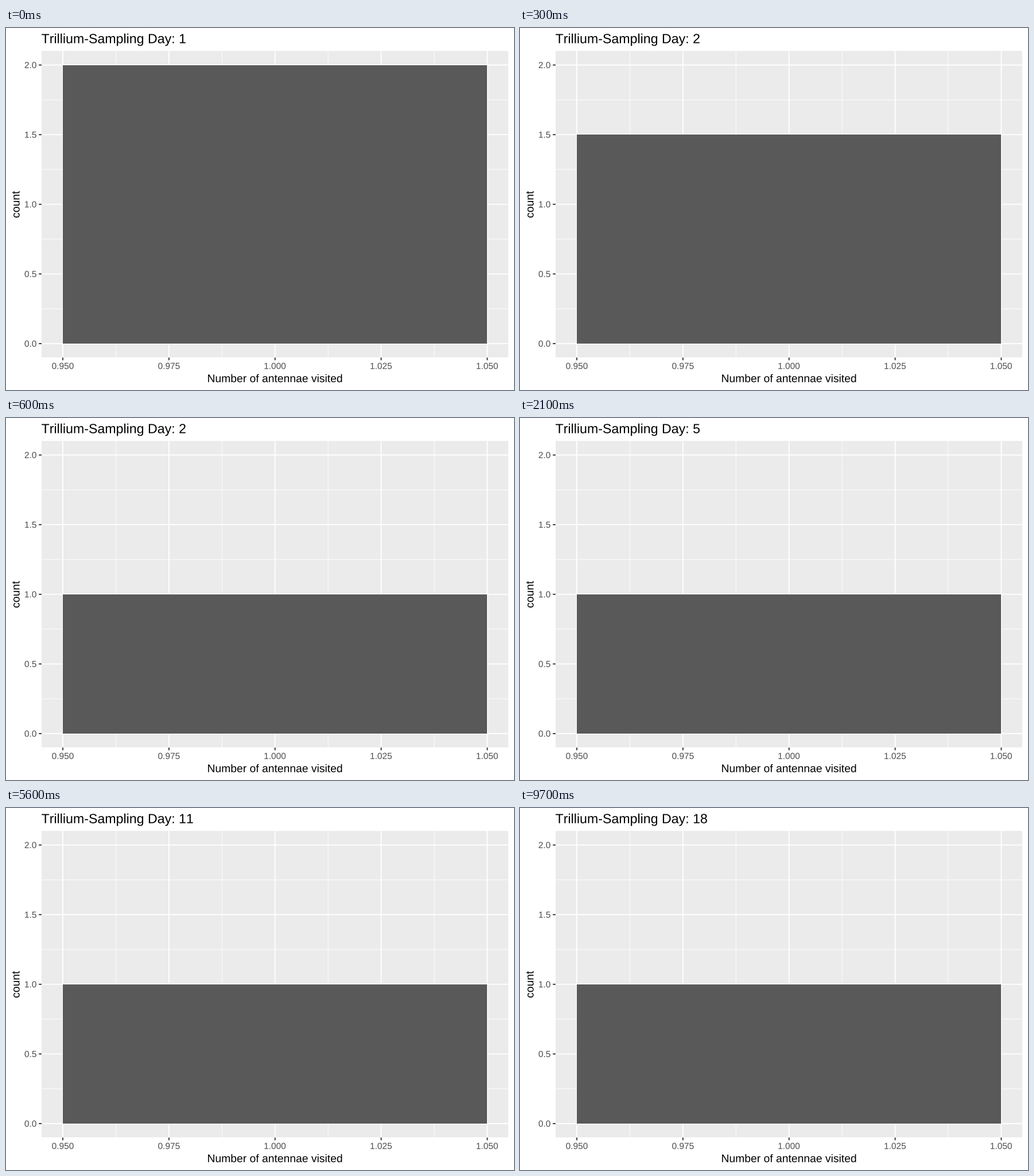
These frames come from a looping animation (885x632 px, 10 s). A matplotlib script:

```python
import matplotlib as mpl
import matplotlib.pyplot as plt
from matplotlib.animation import FuncAnimation
from matplotlib.patches import PathPatch, Rectangle
from matplotlib.textpath import TextPath
from matplotlib.transforms import Affine2D

mpl.rcParams["text.kerning_factor"] = 6  # plain advances, no pair kerning

W, H, DPI = 885, 632, 128
FRAMES, INTERVAL = 100, 100
FALL_FRAMES, LAST_DAY = 6, 18

# Plot panel in pixels, y pointing down
LEFT, RIGHT, TOP, BOTTOM = 62.0, 875.4, 40.3, 575.3
TICK = 4.8
MAJOR, MINOR = 1.87, 0.94
TITLE_PX, AXIS_PX, TICK_PX = 23.17, 19.31, 15.45
FONT = {"family": "Liberation Sans"}

fig = plt.figure(figsize=(W / DPI, H / DPI), dpi=DPI, facecolor="white")
ax = fig.add_axes([0, 0, 1, 1])
ax.set_xlim(0, W)
ax.set_ylim(H, 0)
ax.axis("off")


def px(value):
    """Data x to pixel."""
    return LEFT + (value - 0.945) / 0.11 * (RIGHT - LEFT)


def py(value):
    """Data y to pixel."""
    return BOTTOM - (value + 0.1) / 2.2 * (BOTTOM - TOP)


def line(xs, ys, width, color, z):
    ax.plot(xs, ys, color=color, lw=width * 72 / DPI, zorder=z, snap=False,
            solid_capstyle="butt")


def box(x0, y0, x1, y1, color, z):
    rect = Rectangle((x0, y0), x1 - x0, y1 - y0, fc=color, lw=0, zorder=z)
    return ax.add_patch(rect)


def label(x, y, text, size, color="black", align=0.0, angle=0):
    """Text on baseline y; align is the share of its width left of x."""
    path = TextPath((0, 0), text, size=size, prop=FONT)
    if align:
        ink = path.get_extents()
        shift = -(ink.x0 + align * ink.width)
    else:
        shift = 0
    place = (Affine2D().translate(shift, 0).rotate_deg(angle)
             .scale(1, -1).translate(x, y))
    patch = PathPatch(path, fc=color, lw=0, zorder=6, snap=False,
                      transform=place + ax.transData)
    ax.add_artist(patch)
    return patch


box(round(LEFT), round(TOP), round(RIGHT), round(BOTTOM), "#EBEBEB", 1)

for k in range(4):
    x, y = px(0.9625 + 0.025 * k), py(0.25 + 0.5 * k)
    line([x, x], [TOP, BOTTOM], MINOR, "white", 2)
    line([LEFT, RIGHT], [y, y], MINOR, "white", 2)

for k in range(5):
    xv, yv = 0.95 + 0.025 * k, 0.5 * k
    x, y = px(xv), py(yv)
    line([x, x], [TOP, BOTTOM], MAJOR, "white", 3)
    line([LEFT, RIGHT], [y, y], MAJOR, "white", 3)
    line([x, x], [BOTTOM, BOTTOM + TICK], MAJOR, "#333333", 5)
    line([LEFT - TICK, LEFT], [y, y], MAJOR, "#333333", 5)
    label(x, 595.3, f"{xv:.3f}", TICK_PX, "#4D4D4D", 0.5)
    label(52.8, y + 5.4, f"{yv:.1f}", TICK_PX, "#4D4D4D", 1.0)

label((LEFT + RIGHT) / 2, 618.3, "Number of antennae visited", AXIS_PX, align=0.5)
label(23.5, (TOP + BOTTOM) / 2, "count", AXIS_PX, align=0.5, angle=90)

base = round(py(0))
bar = box(round(px(0.95)), round(py(2)), round(px(1.05)), base, "#595959", 4)
title = label(61.6, 26.5, "Trillium-Sampling Day: 1", TITLE_PX)


def update(i):
    count = 2 - min(i / FALL_FRAMES, 1)
    top = round(py(count))
    bar.set_y(top)
    bar.set_height(base - top)
    day = round(1 + (LAST_DAY - 1) * i / (FRAMES - 1))
    title.set_path(TextPath((0, 0), f"Trillium-Sampling Day: {day}",
                            size=TITLE_PX, prop=FONT))
    return bar, title


anim = FuncAnimation(fig, update, frames=FRAMES, interval=INTERVAL,
                     repeat=True, repeat_delay=0)
plt.show()
```
